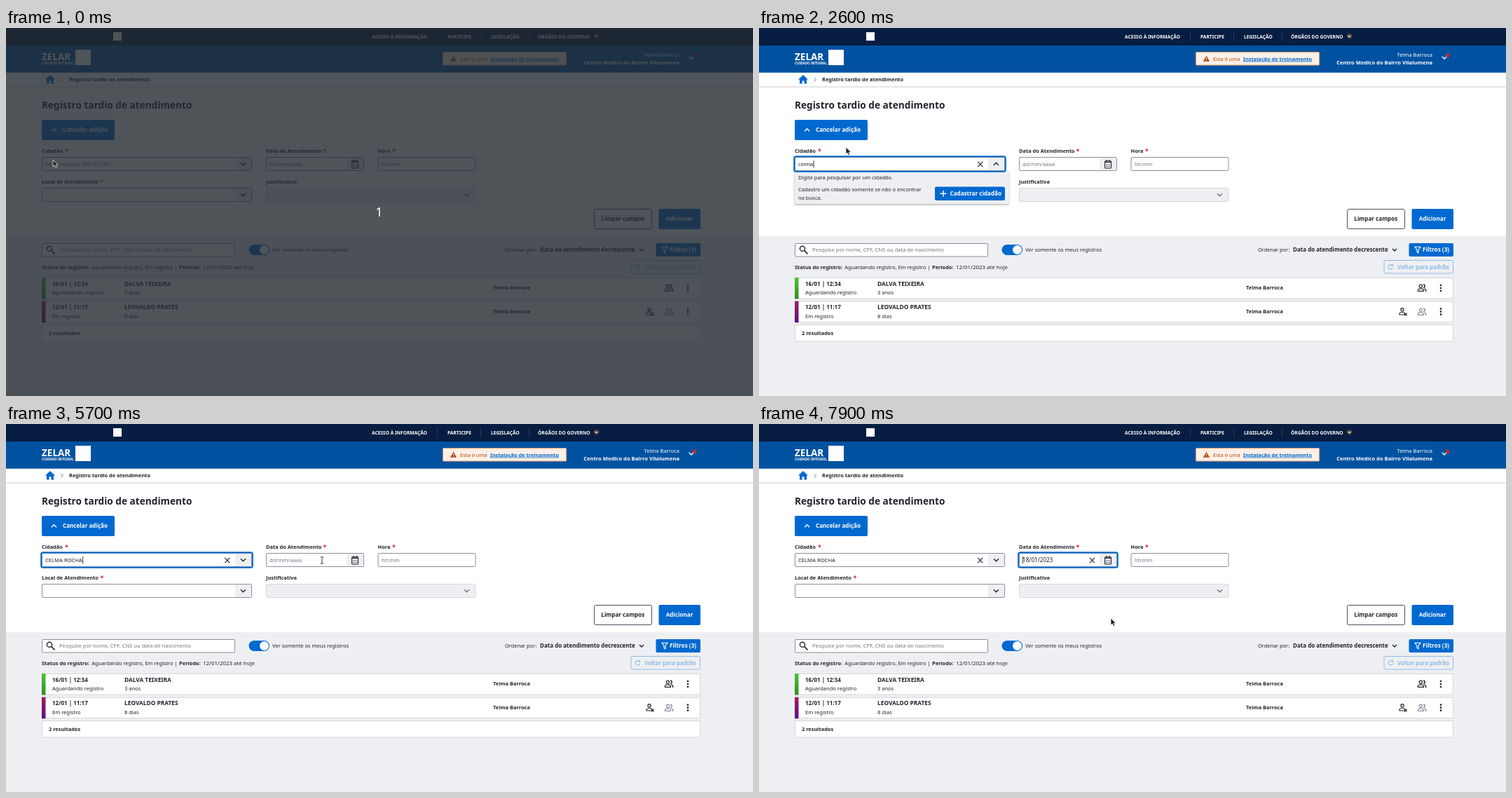
An HTML page that plays this animation: 1066x525 px, repeating every 8 s.

```html
<!DOCTYPE html>
<html lang="pt-BR">
<head>
<meta charset="utf-8">
<title>Registro tardio</title>
<style>
  html, body { margin: 0; width: 100%; height: 100%; overflow: hidden; background: #eeeff2; }
  svg { display: block; width: 1066px; height: 525px; font-family: "Noto Sans", "Open Sans", sans-serif; }
  text { white-space: pre; }
</style>
</head>
<body>
<svg id="stage" viewBox="0 0 1066 525" xmlns="http://www.w3.org/2000/svg"></svg>
<script>
const INK = '#21242d', BLUE = '#0069d0', GREY = '#eeeff2', MUTED = '#717584', FAINT = '#a9adb7', EDGE = '#8b8f9c';
const PERSON = 'Telma Barroca', CITIZEN = 'CELMA ROCHA', TYPED = 'celma';

// y is the visual middle of the line
const text = (x, y, str, { size = 7.5, bold, fill = INK, anchor = 'start', more = '' } = {}) =>
  `<text x="${x}" y="${(y + size * 0.35).toFixed(2)}" font-size="${size}" font-weight="${bold ? 700 : 400}" fill="${fill}" text-anchor="${anchor}" ${more}>${str}</text>`;
const strong = (x, y, str, opts) => text(x, y, str, { size: 7.4, bold: true, ...opts });
const rect = (x, y, w, h, fill, { r = 0, stroke = 'none', more = '' } = {}) =>
  `<rect x="${x}" y="${y}" width="${w}" height="${h}" rx="${r}" fill="${fill}" stroke="${stroke}" ${more}/>`;
const line = (d, stroke = INK, width = 1.3, more = '') =>
  `<path d="${d}" fill="none" stroke="${stroke}" stroke-width="${width}" ${more}/>`;
const group = (id, body, more = '') => `<g id="${id}" ${more}>${body}</g>`;

const chevron = (x, y, dir, color = INK, s = 3.5, width = 1.4) => line({
  down: `M${x - s} ${y - s / 2}l${s} ${s} ${s} ${-s}`,
  up: `M${x - s} ${y + s / 2}l${s} ${-s} ${s} ${s}`,
  left: `M${x + s / 2} ${y - s}l${-s} ${s} ${s} ${s}`,
  right: `M${x - s / 2} ${y - s}l${s} ${s} ${-s} ${s}`
}[dir], color, width);
const cross = (x, y, s = 3.6, width = 1.2) =>
  line(`M${x - s} ${y - s}l${2 * s} ${2 * s}M${x - s} ${y + s}l${2 * s} ${-2 * s}`, INK, width);
const field = (x, y, w, fill = '#fff', stroke = EDGE) => rect(x + .5, y + .5, w - 1, 19, fill, { r: 1.5, stroke });
const label = (x, y, str, starX) => strong(x, y, str) +
  (starX ? strong(starX, y + .5, '*', { fill: '#d2232a', size: 9 }) : '');
const ring = (id, x, w) =>
  rect(x - .8, 183.2, w + 1.6, 21.6, 'none', { r: 2.5, stroke: BLUE, more: `id="${id}" stroke-width="2"` });
const person = (x, y, color) =>
  `<circle cx="${x}" cy="${y - 2.8}" r="2.1" fill="none" stroke="${color}" stroke-width="1.2"/>` +
  line(`M${x - 4} ${y + 4.4}v-1.5q0-2 4-2t4 2v1.5z`, color, 1.2);
const people = (x, y, color) => person(x - 1.6, y, color) +
  line(`M${x + 2} ${y - 5}a2.2 2.2 0 0 1 0 4.4M${x + 3.5} ${y + 1}q2.2.7 2.2 2.2v1.7`, color, 1.4);
const dots = (x, y) => [-4, 0, 4].map(d => `<circle cx="${x}" cy="${y + d}" r="1.35" fill="${INK}"/>`).join('');

function header() {
  const nav = { size: 6.65, fill: '#fff' };
  return rect(0, 0, 1066, 525, GREY) + rect(0, 0, 1066, 25, '#071d41') + rect(0, 25, 1066, 39, '#0052a1') +
    rect(153, 6, 12, 12, '#fff') +
    strong(522, 13, 'ACESSO À INFORMAÇÃO', nav) + strong(630, 13, 'PARTICIPE', nav) +
    strong(692, 13, 'LEGISLAÇÃO', nav) + strong(759, 13, 'ÓRGÃOS DO GOVERNO', nav) +
    line('M615.5 6v13M677.5 6v13M746.5 6v13', '#26395a', 1) +
    `<circle cx="842.5" cy="11.5" r="4" fill="#3b3a38"/>` + chevron(842.5, 11.7, 'down', '#f0dfc0', 2) +
    strong(51, 41, 'ZELAR', { size: 13.5, fill: '#fff' }) +
    strong(51, 50, 'CUIDADO INTEGRAL', { size: 4.6, fill: '#fff' }) + rect(99, 31, 22, 22, '#fff') +
    rect(623.5, 34.5, 176, 18.5, '#fdf0e7', { r: 1, stroke: '#ee9a62' }) +
    `<path d="M638.5 39.5l4.6 8.2h-9.2z" fill="#b5480f"/>` + line('M638.5 42.2v2.6M638.5 45.7v1', '#fff', .9) +
    text(648, 44, 'Esta é uma', { fill: '#b5480f' }) +
    strong(691, 44, 'Instalação de treinamento', { fill: BLUE, more: 'text-decoration="underline"' }) +
    text(961, 38.5, PERSON, { fill: '#fff', anchor: 'end' }) +
    strong(961, 49.7, 'Centro Medico do Bairro Vilalumena', { size: 7.6, fill: '#fff', anchor: 'end' }) +
    chevron(978, 42.3, 'down', '#fff', 3.2) + `<circle cx="982.5" cy="39" r="2.6" fill="#d8232f"/>`;
}

function form() {
  return rect(0, 63.7, 1066, 233.3, '#fff') + rect(0, 83.5, 1066, 1, '#cbced6') +
    `<path d="M63 67l7 6.4h-2v6.1h-3.6v-4.2h-2.8v4.2H58v-6.1h-2z" fill="${BLUE}"/>` +
    chevron(80, 73.7, 'right', MUTED, 2.5, 1) + strong(90, 73.7, 'Registro tardio de atendimento') +
    strong(51, 110.5, 'Registro tardio de atendimento', { size: 13.65 }) +
    rect(51, 131, 104, 29, BLUE, { r: 2 }) + chevron(68.5, 145.5, 'up', '#fff') +
    strong(81, 145.5, 'Cancelar adição', { size: 8.1, fill: '#fff' }) +
    label(51, 175.5, 'Cidadão', 84) + label(371, 175.5, 'Data do Atendimento', 452.5) +
    label(530.5, 175.5, 'Hora', 551) + label(51, 219.5, 'Local de Atendimento', 134.5) + label(371, 219.5, 'Justificativa') +
    field(51, 184, 300) + rect(327, 185, 23, 18, GREY) +
    field(371, 184, 140) + rect(486, 185, 24, 18, GREY, { more: 'id="calButton"' }) +
    field(530.5, 184, 140) + text(536, 194, 'hh:mm', { fill: MUTED }) +
    field(51, 228, 300) + rect(327, 229, 23, 18, GREY) + chevron(338.5, 238, 'down') +
    field(371, 228, 299.5, GREY, '#d5d7dd') + chevron(657.5, 238, 'down', MUTED) +
    rect(493.6, 189.8, 9, 10.2, 'none', { r: 1, stroke: INK, more: 'stroke-width="1.1"' }) +
    line('M493.5 191.3h9.2M496 188v2.5M500.2 188v2.5', INK, 1.3) +
    line('M495.3 195h6M495.3 197.5h6', INK, 1.1, 'stroke-dasharray="1.2 1.1"') +
    rect(839.5, 258.5, 82, 28, '#fff', { r: 2, stroke: '#4b4f5c' }) +
    strong(880.3, 272.5, 'Limpar campos', { size: 8.1, anchor: 'middle' }) +
    rect(931.5, 258, 59.5, 29, BLUE, { r: 2 }) +
    strong(961, 272.5, 'Adicionar', { size: 8.1, fill: '#fff', anchor: 'middle' });
}

function listRow(y, grad, when, status, name, age, action) {
  return rect(51.5, y + .5, 939, 29.5, '#fff', { stroke: '#d5d7dd' }) + rect(51, y, 5.5, 30.5, `url(#${grad})`) +
    strong(66, y + 8.8, when, { size: 8 }) + text(66, y + 21.3, status) +
    strong(169, y + 8.8, name, { size: 8.35 }) + text(169, y + 21.3, age) +
    strong(695, y + 14.7, PERSON) + action + dots(973, y + 15);
}

function list() {
  return rect(51.5, 307.5, 275, 18.5, '#fff', { r: 1.5, stroke: EDGE }) +
    `<circle cx="62" cy="314.8" r="3.6" fill="none" stroke="${INK}" stroke-width="1.4"/>` + line('M64.7 317.5l4.8 4.8', INK, 1.7) +
    text(76, 316.5, 'Pesquise por nome, CPF, CNS ou data de nascimento', { fill: MUTED, size: 7.6 }) +
    rect(346.5, 309, 29.5, 15, BLUE, { r: 7.5 }) + `<circle cx="368.5" cy="316.5" r="6.5" fill="#fff"/>` +
    text(380, 316.5, 'Ver somente os meus registros') +
    text(712, 316.5, 'Ordenar por:', { size: 7.4 }) + strong(762, 316.5, 'Data do atendimento decrescente', { size: 8 }) +
    chevron(907, 316.5, 'down', INK, 3) +
    rect(927.5, 307, 63.5, 19, BLUE, { r: 2 }) + line('M936 312.3h8l-3 4.2v4.2l-2-1.2v-3z', '#fff', 1.1) +
    strong(947, 316.5, 'Filtros (3)', { size: 8.2, fill: '#fff' }) +
    rect(892, 331.5, 98.5, 18.5, 'none', { r: 2, stroke: '#8fbbe8' }) +
    line('M904 338.8a3.2 3.2 0 1 0 .4 3M904.5 336.8v2.4h-2.4', '#8fbbe8', 1.1) +
    strong(911, 341, 'Voltar para padrão', { size: 7.9, fill: '#8fbbe8' }) +
    strong(51, 341, 'Status do registro:') + text(122.3, 341, 'Aguardando registro, Em registro |', { size: 7.4 }) +
    strong(247, 341, 'Período:') + text(281, 341, '12/01/2023 até hoje', { size: 7.9 }) +
    listRow(356, 'green', '16/01 | 12:34', 'Aguardando registro', 'DALVA TEIXEIRA', '3 anos', people(946, 371, INK)) +
    listRow(389.7, 'purple', '12/01 | 11:17', 'Em registro', 'LEOVALDO PRATES', '8 dias',
      person(918, 404.6, INK) + cross(922.7, 408.5, 1.9) + people(946, 405, '#8b8f9c')) +
    rect(51.5, 423.5, 939, 23.5, '#fff', { stroke: '#d5d7dd' }) + strong(61, 435, '2 resultados');
}

function panel(height, body) {
  const bottom = 205 + height;
  return rect(51, 205, 305.5, height, GREY, { more: 'filter="url(#shadow)"' }) + body +
    text(56, bottom - 20.8, 'Cadastre um cidadão somente se não o encontrar') + text(56, bottom - 9, 'na busca.') +
    rect(251, bottom - 24.5, 100, 19.5, BLUE, { r: 2 }) +
    line(`M258.5 ${bottom - 14.8}h9M263 ${bottom - 19.3}v9`, '#fff', 1.4) +
    strong(272.5, bottom - 14.8, 'Cadastrar cidadão', { size: 8.1, fill: '#fff' });
}

const hint = () => panel(46, text(56, 213, 'Digite para pesquisar por um cidadão.'));
const result = () => panel(87,
  strong(56, 215.5, CITIZEN, { size: 7.6 }) +
  strong(56, 227.7, 'CPF') + text(73.5, 227.7, '000.111.222-00', { size: 8.2 }) +
  strong(144, 227.7, 'CNS') + text(162, 227.7, '—', { size: 6.6 }) +
  strong(56, 239.7, 'Nascimento') + text(103, 239.7, '16/01/2020', { size: 8.2 }) +
  strong(56, 251.7, 'Nome da mãe') + text(109, 251.7, 'Desconhece a informação'));

function calendar() {
  const colX = c => 386 + c * 25.12, center = { anchor: 'middle' };
  let out = rect(371, 205, 181, 171.5, '#fff', { more: 'filter="url(#shadow)"' }) +
    chevron(391, 219, 'left') + strong(414.5, 219, 'Jan', center) + chevron(438, 219, 'right') +
    chevron(478.5, 219, 'left') + strong(505, 219, '2023', { ...center, size: 8 }) + chevron(531.5, 219, 'right') +
    `<circle id="dayHover" cx="461.4" cy="314.6" r="9" fill="#e2e4e9"/>`;
  [...'SMTWTFS'].forEach((d, c) => out += strong(colX(c), 245.3, d, center));
  for (let i = 0; i < 35; i++) {
    const day = i % 31 + 1, open = i > 10 && i < 19;
    out += text(colX(i % 7), 268 + Math.floor(i / 7) * 23.25, day,
      { ...center, size: 8, bold: i === 18, fill: open ? INK : FAINT });
  }
  return out;
}

const pointers =
  group('arrow', `<path d="M0 0v10l2.3-2.1 1.5 3.5 1.9-.8-1.5-3.4h3.1z" fill="#222" stroke="#fff" stroke-width=".7"/>`) +
  group('beam', line('M-2.2-5q2.2 0 2.2 1.2v7.6q0 1.2-2.2 1.2M2.2-5q-2.2 0-2.2 1.2M0 3.8q0 1.2 2.2 1.2', '#333', 1)) +
  group('hand', `<path d="M-1 0q1-1 2 0v4l4.2.8q1.3.4 1.2 1.8l-.5 4.9h-5.8l-3.4-5q.5-1.2 2.3.2z" fill="#222" stroke="#fff" stroke-width=".6"/>`);

const gradient = (id, from, to) =>
  `<linearGradient id="${id}" x2="0" y2="1"><stop stop-color="${from}"/><stop offset="1" stop-color="${to}"/></linearGradient>`;

const stage = document.getElementById('stage');
stage.innerHTML = `<defs>${gradient('green', '#4fc23a', '#2f8f1d')}${gradient('purple', '#a3195b', '#5a0f8c')}
  <filter id="shadow" x="-10%" y="-10%" width="120%" height="125%"><feDropShadow dx="0" dy="1" stdDeviation="1.6" flood-color="#000" flood-opacity=".38"/></filter></defs>` +
  header() + form() + list() +
  group('chevDown', chevron(338.5, 194, 'down')) + group('chevUp', chevron(338.5, 194, 'up')) +
  group('clearCitizen', cross(315.8, 194.5)) + group('clearDate', cross(475.5, 194.5)) +
  text(56, 194, '', { more: 'id="citizen"' }) + text(376, 194, '', { more: 'id="date"' }) +
  rect(0, 189, .9, 10.5, INK, { more: 'id="caret"' }) +
  group('hint', hint()) + group('result', result()) +
  ring('citizenRing', 51, 300) + ring('dateRing', 371, 140) +
  group('calendar', calendar()) +
  group('countdown', rect(0, 0, 1066, 525, 'rgb(36,42,48)', { more: 'fill-opacity=".8"' }) +
    text(532.5, 262.5, '1', { size: 18, fill: '#fff', anchor: 'middle' })) +
  group('pointer', pointers);

const el = {};
stage.querySelectorAll('[id]').forEach(node => el[node.id] = node);
const show = (id, on) => el[id].setAttribute('visibility', on ? 'inherit' : 'hidden');

// time, x, y, pointer shape
const path = [
  [0, 67, 188, 'arrow'], [100, 67, 190, 'beam'], [600, 84, 195, 'beam'], [900, 84, 195, 'beam'],
  [1300, 117, 175, 'arrow'], [1400, 121, 172, 'arrow'], [1600, 124, 170, 'arrow'], [4700, 124, 170, 'arrow'],
  [5100, 545, 184, 'arrow'], [5400, 406, 184, 'beam'], [5600, 406, 184, 'beam'], [5700, 451, 194.5, 'beam'],
  [5800, 477, 203, 'arrow'], [5900, 477, 203, 'arrow'], [6000, 499, 194, 'hand'], [6500, 502, 194, 'hand'],
  [6800, 502, 194, 'hand'], [7400, 461, 316, 'hand'], [7600, 461, 316, 'hand'], [7900, 502, 277, 'arrow'], [8000, 502, 277, 'arrow']
];

function pointerAt(t) {
  const i = path.findIndex((p, k) => t < path[k + 1][0]);
  const [t0, x0, y0, kind] = path[i], [t1, x1, y1] = path[i + 1], f = (t - t0) / (t1 - t0);
  return { x: x0 + (x1 - x0) * f, y: y0 + (y1 - y0) * f, kind };
}

function setInput(node, value, placeholder, size) {
  node.textContent = value || placeholder;
  node.setAttribute('fill', value ? INK : MUTED);
  node.setAttribute('font-size', size);
}

function draw(t) {
  const during = (from, to = 8000) => t >= from && t < to;
  const letters = [2100, 2200, 2300, 2600, 2600].filter(at => t >= at).length;
  const citizen = t >= 4200 ? CITIZEN : TYPED.slice(0, letters);
  setInput(el.citizen, citizen, 'Pesquise pelo CPF ou CNS.', 7.65);
  setInput(el.date, during(7700) ? '18/01/2023' : '', 'dd/mm/aaaa', during(7700) ? 8.2 : 7.6);

  const open = during(900, 4200);
  show('chevUp', open);
  show('chevDown', !open);
  show('hint', during(900, 3100));
  show('result', during(3100, 4200));
  show('citizenRing', during(800, 6200));
  show('clearCitizen', during(2100));
  show('calendar', during(6200, 7700));
  show('dayHover', during(7300, 7700));
  show('dateRing', during(7700));
  show('clearDate', during(7700));
  el.calButton.setAttribute('fill', during(6000, 7000) ? '#d3d5dc' : GREY);

  show('caret', during(800, 6200) || during(7700));
  const caretX = during(7700) ? 376 : 56.2 + (citizen ? el.citizen.getComputedTextLength() : 0);
  el.caret.setAttribute('x', caretX);

  const { x, y, kind } = pointerAt(t);
  el.pointer.setAttribute('transform', `translate(${x} ${y})`);
  for (const shape of ['arrow', 'beam', 'hand']) show(shape, shape === kind);
  show('countdown', t < 100);
}

const start = performance.now();
function tick() {
  const t = (performance.now() - start) % 8000;
  draw(Math.floor(t / 100) * 100);
  requestAnimationFrame(tick);
}
tick();
</script>
</body>
</html>
```
